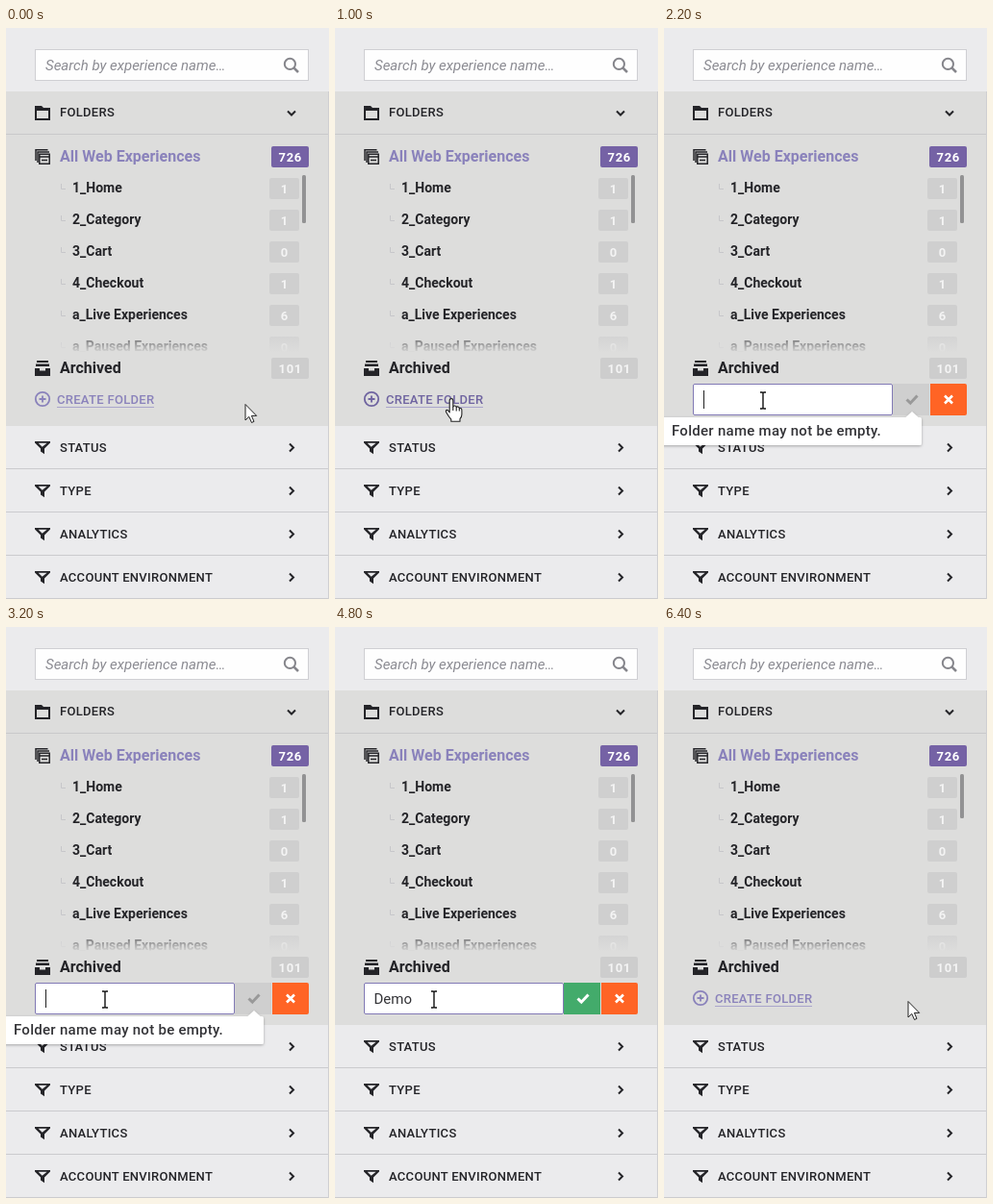
An HTML page that plays this animation: 336 by 594 pixels, repeating every 6.8 s.

```html
<!DOCTYPE html>
<html lang="en">
<head>
<meta charset="utf-8">
<title>Create folder</title>
<style>
  html, body { margin: 0; width: 100%; height: 100%; overflow: hidden; background: #ebebed; }
  svg { display: block; width: 336px; height: 594px; font-family: Roboto, sans-serif; fill: #242428; }
  text { white-space: pre; }
  .caps { font-size: 13px; font-weight: 500; letter-spacing: .3px; }
  .main { font-size: 16px; font-weight: 600; }
  .child { font-size: 14px; font-weight: 600; }
  .count { font-size: 13px; font-weight: 700; letter-spacing: .7px; text-anchor: middle; }
  .field { font-size: 15px; }
  .line { fill: none; stroke: #242428; stroke-width: 2; }
</style>
</head>
<body>
<svg id="stage" viewBox="0 0 336 594">
  <defs>
    <linearGradient id="fade" x1="0" y1="0" x2="0" y2="1">
      <stop offset="0" stop-color="#dddddc" stop-opacity="0"/>
      <stop offset="1" stop-color="#dddddc" stop-opacity=".95"/>
    </linearGradient>
    <filter id="shadow" x="-10%" y="-30%" width="120%" height="170%">
      <feDropShadow dx="0" dy="1" stdDeviation="1.5" flood-opacity=".3"/>
    </filter>
    <clipPath id="listClip"><path d="M0 112H336V336.5H0z"/></clipPath>
    <path id="funnel" d="M30 -6H46V-4.6L40 1.4V7.2L36 4.6V1.4L30 -4.6zM33.6 -4.2L37.7 -.2L42.6 -4.2z" fill-rule="evenodd"/>
    <path id="chevron" class="line" d="M-2 -4L2 0L-2 4"/>
  </defs>

  <rect width="336" height="594" fill="#ebebed"/>
  <rect x="30.5" y="22.5" width="284" height="32" fill="#fefefe" stroke="#cfcfd3"/>
  <text x="41" y="44" font-size="15" font-style="italic" fill="#8b8b92">Search by experience name…</text>
  <g fill="none" stroke="#85858b" stroke-width="2">
    <circle cx="295.4" cy="37.4" r="5.6"/>
    <path d="M299.6 41.6L304 46" stroke-width="2.6"/>
  </g>

  <rect y="66" width="336" height="348" fill="#dddddc"/>
  <path d="M0 110.5H336" stroke="#c9c9ca"/>
  <path d="M30 81H37L39 83H46V96H30zM32 86V94H44V86z" fill-rule="evenodd"/>
  <text class="caps" x="56" y="92">FOLDERS</text>
  <use href="#chevron" transform="translate(297 88.5) rotate(90)"/>

  <g class="line" stroke-width="1.5" style="stroke-width:1.5">
    <path d="M31 138V126.8H43.5M33 140V129H45"/>
    <path d="M34.8 131.2H45.2V141.2H34.8zM35 134H45"/>
    <path d="M37 137.5H43"/>
  </g>
  <text class="main" x="56" y="139" fill="#8a82bb">All Web Experiences</text>
  <g id="list" clip-path="url(#listClip)"></g>
  <rect y="311" width="306" height="26" fill="url(#fade)"/>
  <rect id="thumb" x="308" y="153" width="4" rx="1.5" fill="#929293"/>

  <path d="M32 346H44V348H32zM31 349.5H45V352H31zM30 354H35V356.5H41V354H46V362H30z"/>
  <text class="main" x="56" y="359">Archived</text>
  <g id="badges"></g>

  <g id="link">
    <circle cx="38" cy="386" r="7.2" fill="none" stroke="currentColor" stroke-width="1.8"/>
    <path d="M34.5 386H41.5M38 382.5V389.5" stroke="currentColor" stroke-width="1.8"/>
    <text class="caps" x="53" y="391" fill="currentColor">CREATE FOLDER</text>
    <path d="M53 394.5H154" stroke="#aaa5cb"/>
  </g>

  <g id="filters"></g>
  <path d="M335.5 66V594" stroke="#cfcfd2"/>

  <g id="editor">
    <path id="ok" d="M238 370H276V403H238z"/>
    <path id="tick" d="M252.5 386.5L256.3 390.2L263.5 382.5" fill="none" stroke-width="3"/>
    <path d="M277 370H313Q315 370 315 372V401Q315 403 313 403H277z" fill="#ff6425"/>
    <path d="M292 382.5L300 390.5M300 382.5L292 390.5" stroke="#fff" stroke-width="2.6"/>
    <rect x="30.5" y="370.5" width="207" height="32" rx="1.5" fill="#fff" stroke="#8179b5"/>
    <text id="name" class="field" x="40.5" y="392" fill="#333337"></text>
    <path id="caret" d="M0 377V396" stroke="#222"/>
  </g>
  <g id="tip">
    <path d="M-6 405H251.5L258 399L264.5 405H266Q268 405 268 407V432Q268 434 266 434H-6z" fill="#fff" filter="url(#shadow)"/>
    <text x="8" y="424" font-size="15" font-weight="500" letter-spacing=".27" fill="#333337">Folder name may not be empty.</text>
  </g>

  <path id="arrow" d="M0 .5V17L3.8 13.4L6.5 19.5L9 18.4L6.4 12.4H11.7z" fill="#fff" stroke="#222"/>
  <g id="hand" fill="#fff" stroke="#222" stroke-width="1.1" stroke-linejoin="round">
    <path d="M-1.8 14V1.5Q-1.8 -.4 0 -.4T1.8 1.5V8Q2.4 6.7 3.8 7Q5.2 7.3 5.2 8.6Q5.8 7.7 7 8Q8.3 8.4 8.3 9.7Q10.9 8.8 10.9 11.8V16Q10.9 18.6 9 20.6V23.2H-.2V21.2Q-2.6 18.6 -5.3 13.8Q-6.2 11.6 -4.5 11.4Q-3.2 11.4 -1.8 14z"/>
    <path d="M1.8 8V12M5.2 8.6V12.4M8.3 9.7V12.6" fill="none"/>
  </g>
  <path id="beam" d="M-3 -8H-1Q0 -8 0 -7Q0 -8 1 -8H3M0 -7V8M-3 9H-1Q0 9 0 8Q0 9 1 9H3" fill="none" stroke="#111" stroke-width="1.4"/>
</svg>

<script>
const LOOP = 6800, STEP = 200;
const $ = id => document.getElementById(id);
const show = (id, on) => $(id).setAttribute('display', on ? 'inline' : 'none');
const set = (id, name, value) => $(id).setAttribute(name, value);

const badge = (x, y, w, label, fill, ink) =>
  `<rect x="${x}" y="${y - 11}" width="${w}" height="22" rx="2" fill="${fill}"/>
   <text class="count" x="${x + w / 2 + .3}" y="${y + 4.5}" fill="${ink}">${label}</text>`;

const folders = [['1_Home', 1], ['2_Category', 1], ['3_Cart', 0], ['4_Checkout', 1],
  ['a_Live Experiences', 6], ['a_Paused Experiences', 0]];
$('list').innerHTML = folders.map(([label, count], i) => {
  const y = 166 + 33 * i;
  return `<path d="M57.5 ${y - 4}V${y + 1.5}H62" fill="none" stroke="#c6c6ca"/>
    <text class="child" x="69" y="${y + 5}">${label}</text>` +
    badge(274, y + 1, 31, count, '#cfcfcf', '#f4f4f4');
}).join('');

$('badges').innerHTML = badge(276, 134, 39, 726, '#7562a5', '#fff') +
  badge(276, 354, 39, 101, '#cdcdcd', '#f4f4f4');

$('filters').innerHTML = ['STATUS', 'TYPE', 'ANALYTICS', 'ACCOUNT ENVIRONMENT'].map((label, i) => {
  const y = 436 + 45 * i;
  return `<use href="#funnel" y="${y}"/><text class="caps" x="56" y="${y + 4.5}">${label}</text>
    <use href="#chevron" x="297" y="${y + .5}"/><path d="M0 ${y + 22.5}H336" stroke="#cbcbce"/>`;
}).join('');

const typing = [[3600, 'D'], [4000, 'De'], [4200, 'Dem'], [4600, 'Demo'], [5000, 'Demo1']];
const blinks = [[2600, 3200], [4800, 5000], [5800, 6400]];

function pointer(t) {
  if (t <= 1000) {
    const u = t / 1000, e = u * u * (3 - 2 * u);
    return [249 - 128 * e, 391 - 5 * e];
  }
  if (t < 1400) return [105, 385];
  if (t < 1800) return [101, 385];
  if (t < 2200) return [103, 385];
  if (t < 5800) return [103, 387];
  return t < 6000 ? [196, 388] : [254, 389];
}

function draw(time) {
  const t = Math.floor(time % LOOP / STEP) * STEP;
  const editing = t >= 2200 && t < 6400;
  const [x, y] = pointer(t);
  const overLink = t < 2200 && x < 155;
  const overOk = editing && x > 238;
  const name = typing.reduce((text, [at, value]) => t >= at ? value : text, '');

  show('link', !editing);
  show('editor', editing);
  show('tip', editing && !name);
  $('link').style.color = overLink ? '#6f64a0' : '#8a82bb';

  $('name').textContent = name;
  const end = name ? $('name').getComputedTextLength() + 40.5 : 41;
  set('caret', 'transform', `translate(${Math.floor(end) + .5} 0)`);
  show('caret', !blinks.some(([from, to]) => t >= from && t < to));

  set('ok', 'fill', !name ? '#cfcfcf' : overOk ? '#35925b' : '#43ab6b');
  set('tick', 'stroke', !name ? '#999' : overOk ? '#222' : '#fff');
  set('thumb', 'height', t >= 6400 ? 46 : 50);

  const kind = overLink ? 'hand' : editing && !overOk ? 'beam' : 'arrow';
  for (const id of ['arrow', 'hand', 'beam']) show(id, id === kind);
  set(kind, 'transform', `translate(${Math.round(x)} ${Math.round(y)})`);
}

const start = performance.now();
function tick() {
  draw(performance.now() - start);
  requestAnimationFrame(tick);
}
tick();
</script>
</body>
</html>
```
